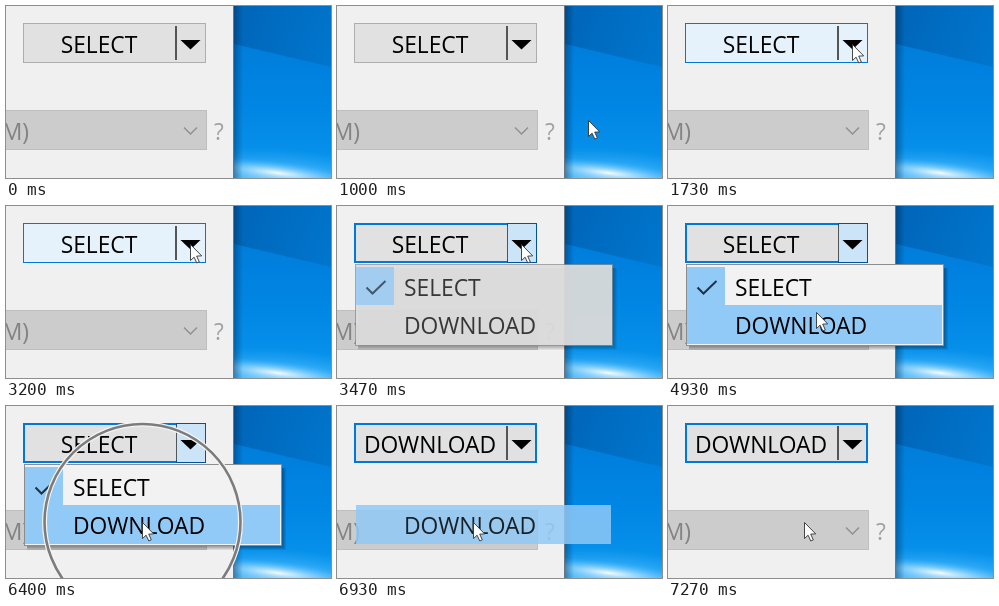
An HTML page with a canvas for the animation above (8 s loop, 325 by 172 pixels).

```html
<!DOCTYPE html>
<html lang="en">
<head>
<meta charset="utf-8">
<title>Split button menu</title>
<style>
html, body { margin: 0; width: 100%; height: 100%; overflow: hidden; background: #f0f0f0 }
canvas { display: block }
</style>
</head>
<body>
<canvas id="stage" width="325" height="172"></canvas>
<script>
const c = document.getElementById('stage').getContext('2d');
const BLUE = '#0078d7', PICK = '#91c9f7';
const TICK = 1000 / 15, LOOP = 8000;
const ROWS = [61, 99, 138];

// pointer stops: tick, x, y
const stops = [
  [6, 326, 172], [19, 218, 88], [26, 184, 38], [61, 184, 38], [66, 172, 56],
  [74, 148, 106], [75, 148, 106], [76, 145, 109], [77, 145, 109], [78, 142, 112],
  [80, 142, 112], [83, 136, 116], [120, 136, 116]
];

function pointerAt(k) {
  const i = Math.max(1, stops.findIndex(s => s[0] >= k));
  const [k0, x0, y0] = stops[i - 1], [k1, x1, y1] = stops[i];
  const u = Math.max(0, (k - k0) / (k1 - k0));
  return [Math.round(x0 + (x1 - x0) * u), Math.round(y0 + (y1 - y0) * u)];
}

function rect(x, y, w, h, fill) {
  c.fillStyle = fill;
  c.fillRect(x, y, w, h);
}

function framed(x, y, w, h, fill, edge, b = 1) {
  rect(x, y, w, h, edge);
  rect(x + b, y + b, w - 2 * b, h - 2 * b, fill);
}

function path(points, fill, stroke, width = 1) {
  c.beginPath();
  points.forEach(([x, y]) => c.lineTo(x, y));
  if (fill) {
    c.closePath();
    c.fillStyle = fill;
    c.fill();
  }
  if (stroke) {
    c.strokeStyle = stroke;
    c.lineWidth = width;
    c.stroke();
  }
}

function text(s, x, y, color = '#000', align = 'left') {
  c.font = '22.8px "Open Sans", "Noto Sans", sans-serif';
  c.textAlign = align;
  c.fillStyle = color;
  c.fillText(s, x, y);
}

function fade(gradient, ...colors) {
  colors.forEach((color, i) => gradient.addColorStop(i / (colors.length - 1), color));
  return gradient;
}

function glow(x, y, rx, ry, angle, color) {
  c.save();
  c.translate(x, y);
  c.rotate(angle);
  c.scale(rx, ry);
  rect(-1, -1, 2, 2, fade(c.createRadialGradient(0, 0, 0, 0, 0, 1), color, 'rgba(60,180,255,0)'));
  c.restore();
}

function desktop() {
  c.save();
  c.beginPath();
  c.rect(228, 0, 97, 172);
  c.clip();
  rect(228, 0, 97, 172, fade(c.createLinearGradient(0, 30, 0, 172), '#007cda', '#0086e4', '#0a96ee'));
  path([[228, 0], [325, 0], [325, 61], [228, 38]],
    fade(c.createLinearGradient(228, 0, 325, 40), '#0065b8', '#006dc2', '#0075cc'));
  glow(270, 178, 130, 36, 0.05, 'rgba(150,225,255,.95)');
  glow(272, 167, 85, 12, 0.12, 'rgba(255,255,255,.95)');
  rect(228, 0, 9, 172, fade(c.createLinearGradient(228, 0, 237, 0), 'rgba(0,20,50,.35)', 'rgba(0,20,50,0)'));
  c.restore();
  rect(227, 0, 1, 172, '#6b7680');
}

function button(state, label) {
  const edge = state == 'idle' ? '#adadad' : BLUE;
  const fill = state == 'hover' ? '#e5f1fb' : '#e1e1e1';
  const open = state == 'open';
  framed(17, 17, 183, 40, fill, edge, open || state == 'focus' ? 2 : 1);
  if (open) framed(170, 17, 30, 40, '#cce4f7', '#005499');
  rect(open ? 170 : 169, 20, open ? 1 : 2, 34, '#555');
  text(label, 93, 47, '#000', 'center');
  path([[174.5, 34], [194.5, 34], [184.5, 43.5]], '#000');
}

function combo() {
  framed(-2, 104, 203, 40, '#cccccc', '#bfbfbf');
  text('M)', 23, 134, '#838383', 'right');
  path([[178, 121.5], [184.5, 128], [191, 121.5]], null, '#909090', 1.5);
  text('?', 208, 134, '#a0a0a0');
}

function item(row, width = 255) {
  rect(19, ROWS[row], width, ROWS[row + 1] - ROWS[row], PICK);
}

function menu(row) {
  for (let i = 4; i; i--) rect(21, 62, 255 + i, 78 + i, 'rgba(0,0,0,.09)');
  framed(18, 58, 258, 82, '#f2f2f2', '#8c8c8c');
  item(0, 38);
  if (row >= 0) item(row);
  path([[29.5, 81.5], [35.5, 87.5], [48.5, 75]], null, '#223240', 2);
  text('SELECT', 67, 90);
  text('DOWNLOAD', 67, 128);
}

function arrow(x, y) {
  c.save();
  c.translate(x + .5, y + .5);
  path([[0, 0], [0, 16], [3.6, 12.7], [6.3, 18.5], [8.8, 17.4], [6.2, 11.6], [11.2, 11.4]], '#fff', '#333', .9);
  c.restore();
}

function ring(x, y, k) {
  const r = 98 * (1 - k / 5);
  if (k < 0 || r <= 0) return;
  c.beginPath();
  c.arc(x + .5, y, r, 0, 7);
  for (const [width, color] of [[5, '#f4f4f4'], [2.6, '#7c7c7c']]) {
    c.strokeStyle = color;
    c.lineWidth = width;
    c.stroke();
  }
}

function draw(k) {
  const [x, y] = pointerAt(k);
  const done = k >= 104, open = k >= 50 && !done;
  const hover = k < 50 && x < 200 && y < 57;
  rect(0, 0, 325, 172, '#f0f0f0');
  desktop();
  combo();
  button(done ? 'focus' : open ? 'open' : hover ? 'hover' : 'idle', done ? 'DOWNLOAD' : 'SELECT');
  if (open) {
    c.globalAlpha = Math.min(1, (k - 49) / 4);
    menu(y >= ROWS[1] ? 1 : y >= ROWS[0] ? 0 : -1);
  } else if (done && k < 109) {
    c.globalAlpha = (109 - k) / 6;
    item(1);
    text('DOWNLOAD', 67, 128);
  }
  c.globalAlpha = 1;
  ring(x, y, k < 60 ? k - 43 : k - 96);
  if (k > 6) arrow(x, y);
}

const start = performance.now();
function frame() {
  const t = (performance.now() - start) % LOOP;
  draw(Math.floor((t + 4) / TICK) % 120);
  requestAnimationFrame(frame);
}
frame();
</script>
</body>
</html>
```
